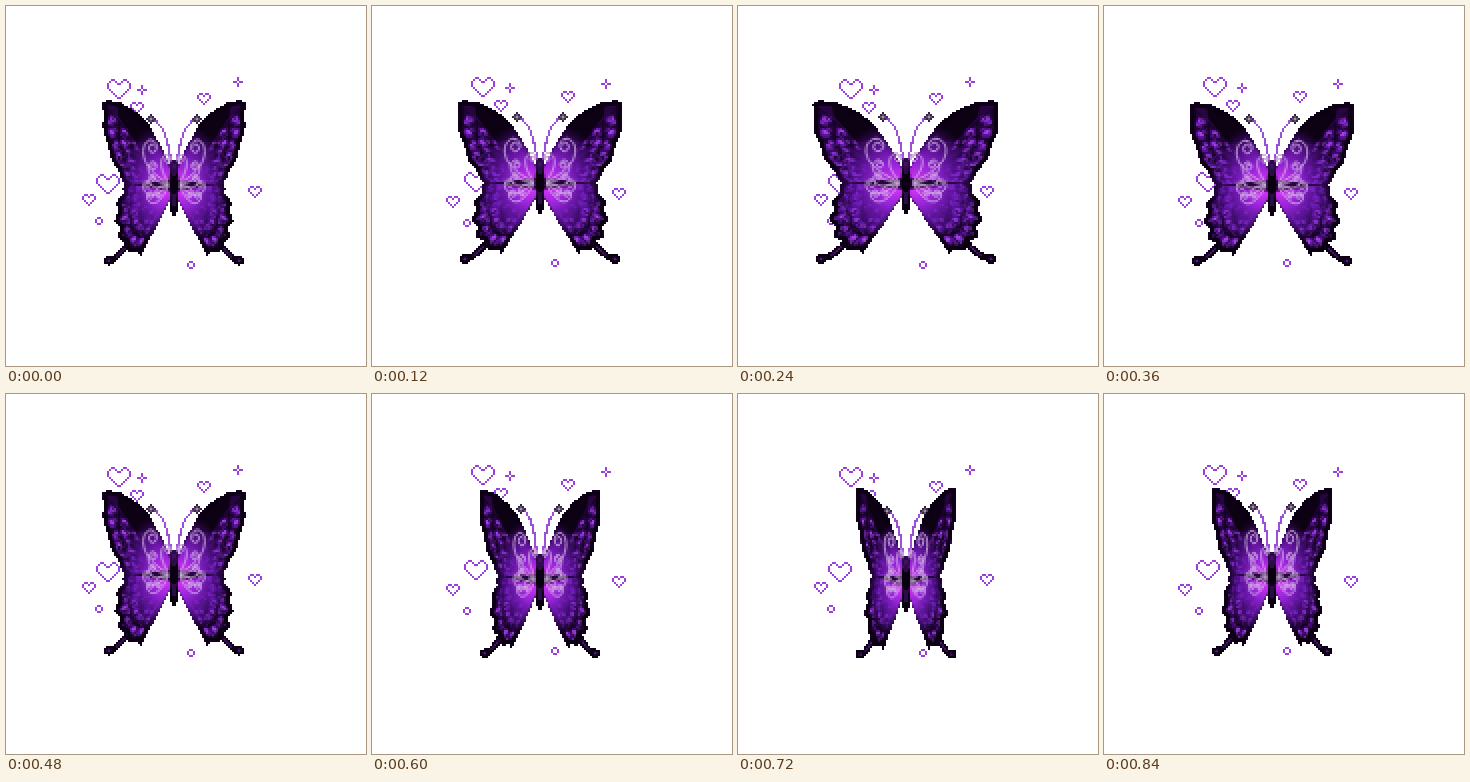
Write an HTML page with a canvas that moves like this. It is 360 by 360 pixels and loops after 960 ms.

```html
<!DOCTYPE html>
<html lang="en">
<head>
<meta charset="utf-8">
<title>Butterfly</title>
<style>
html, body { margin: 0; width: 100%; height: 100%; overflow: hidden; background: #fff; }
canvas { display: block; width: 100vw; height: 100vh; }
</style>
</head>
<body>
<canvas id="stage" width="360" height="360"></canvas>
<script>
const STEP = 120, STEPS = 8, SIZE = 360, MID = 168, ROOT = 177;
const INK = '#0b0012';

// painter, centre, and the shift taken on every second step
const CHARMS = [
  [bigHeart, 113, 83, -2, -2], [smallHeart, 131, 102, -2, -2], [smallHeart, 198, 93, -2, -2],
  [star, 136, 84, 2, -2], [star, 232, 76, 2, 2], [bigHeart, 102, 178, 2, -2],
  [smallHeart, 83, 194, -2, 2], [ring, 93, 215, 2, 2], [smallHeart, 249, 186, -2, 2],
  [ring, 185, 259, -2, -2]
];

// heading, length, bend
const FLOURISHES = [
  [-0.5, 100, -0.9], [-0.95, 58, -0.9], [-0.2, 64, -0.9],
  [0.25, 52, -0.9], [0.55, 66, -0.9], [0.95, 62, -0.9], [0.1, 40, 0.9]
];

function layer(size) {
  const canvas = document.createElement('canvas');
  canvas.width = canvas.height = size;
  return canvas.getContext('2d');
}

function seeded(seed) {
  return () => (seed = seed * 16807 % 2147483647) / 2147483647;
}

const range = (count, make) => Array.from({ length: count + 1 }, (_, i) => make(i / count));

function polyline(points) {
  const path = new Path2D();
  points.forEach(([x, y]) => path.lineTo(x, y));
  return path;
}

function line(g, points, color, width) {
  g.strokeStyle = color;
  g.lineWidth = width;
  g.stroke(polyline(points));
}

function dot(g, x, y, rx, ry, color) {
  g.fillStyle = color;
  g.beginPath();
  g.ellipse(x, y, rx, ry, 0, 0, 7);
  g.fill();
}

// Wing space: distance from the body axis, height on the stage.
const fan = (angle, r) => [r * Math.cos(angle), ROOT + r * Math.sin(angle)];

const upperRim = (t, scale = 1) =>
  fan(-0.71 * t, scale * (62 + 60 * t ** 1.15 + 1.2 * Math.sin(19 * t)));

const lowerRim = (t, scale = 1) =>
  fan(1.02 * t, scale * (60 + 27 * Math.sin(2.2 * t) + 2.8 * Math.sin(32 * t)));

const RIMS = [upperRim, lowerRim];

const OUTLINES = [
  [...range(40, t => upperRim(t)), [86, 95], [70, 97], [50, 105], [34, 117], [19, 137], [8, 155], [0, 170], [0, 184]],
  [...range(60, t => lowerRim(t)), [36, 236], [22, 217], [10, 198], [0, 185], [0, 172]]
];

function flourish([heading, length, bend]) {
  const count = 30;
  let [x, y] = [6, ROOT];
  return range(count, t => {
    heading += bend * t * t;
    x += length / count * Math.cos(heading);
    y += length / count * Math.sin(heading);
    return [x, y];
  });
}

function paintTail(g, map) {
  const points = range(8, t => [58 + 27 * t, 234 + 19 * Math.sin(t * 1.5)]).map(map);
  const [x, y] = points[8];
  line(g, points, INK, 6);
  dot(g, x, y, 5, 4.4, INK);
  line(g, points.slice(2, 6), '#6a20a0', 1.6);
  dot(g, x, y, 1.8, 1.4, '#5a1890');
}

function paintPatches(g, map, spread) {
  for (const rim of RIMS) {
    for (const [scale, size] of [[0.7, 6], [0.87, 6.5]]) {
      range(6, t => {
        const [x, y] = map(rim(0.06 + 0.88 * t, scale));
        dot(g, x, y, size * spread, size * 0.8, '#5a129c');
        dot(g, x, y - 1, size * spread * 0.55, size * 0.4, '#a440ea');
      });
    }
  }
}

function paintFlecks(g, map) {
  const random = seeded(41);
  for (let i = 0; i < 300; i++) {
    const rim = RIMS[i % 2];
    const [x, y] = map(rim(random(), 0.45 + 0.5 * random()));
    g.fillStyle = random() > 0.6 ? '#9a3fe499' : '#0d001a99';
    g.fillRect(x, y, 2 + 2 * random(), 2 + 2 * random());
  }
}

function paintVeins(g, map) {
  for (const rim of RIMS) {
    range(6, t => line(g, [rim(t, 0.35), rim(t, 0.97)].map(map), '#12001ecc', 1.8));
    line(g, range(20, t => rim(t, 0.78)).map(map), '#12001eaa', 2);
  }
}

// Black leading edge in the upper corner of the wing.
function paintShade(g, map) {
  g.fillStyle = '#0a0010e6';
  g.fill(polyline([[28, 122], [50, 104], [74, 97], [72, 110], [60, 124], [48, 136], [34, 134]].map(map)));
}

function paintGlow(g, spread, drop) {
  g.save();
  g.translate(0, ROOT + drop);
  g.scale(spread, 1);
  const glow = g.createRadialGradient(10, 2, 5, 10, 0, 62);
  glow.addColorStop(0, '#cf35f4');
  glow.addColorStop(0.3, '#9d26e4e8');
  glow.addColorStop(0.65, '#6f18bc99');
  glow.addColorStop(1, '#5a129c00');
  g.fillStyle = glow;
  g.fillRect(0, -90, 110, 180);
  g.restore();
}

function paintWing(g, { spread, drop, lift }) {
  const map = ([u, v]) => [u * spread, v + drop - lift * (u / 93) * (1 + (175 - v) / 130)];
  const shapes = OUTLINES.map(points => polyline(points.map(map)));
  const whole = new Path2D();
  shapes.forEach(shape => whole.addPath(shape));

  paintTail(g, map);
  g.save();
  g.fillStyle = '#27063f';
  shapes.forEach(shape => g.fill(shape));
  g.clip(whole);
  paintPatches(g, map, spread);
  paintFlecks(g, map);
  paintVeins(g, map);
  paintShade(g, map);
  g.strokeStyle = INK;
  g.lineWidth = 8;
  shapes.forEach(shape => g.stroke(shape));
  paintGlow(g, spread, drop);
  g.restore();
  FLOURISHES.forEach(f => line(g, flourish(f).map(map), '#d6b4e4d0', 1.9));
}

function paintAntenna(g, { drop, reach }) {
  const top = 87 + reach + drop;
  const stalk = new Path2D();
  stalk.moveTo(reach, top);
  stalk.bezierCurveTo(reach * 0.5, top + 4, 5, top + 22, 3, 155 + drop);
  g.strokeStyle = '#9c50d8';
  g.lineWidth = 2;
  g.stroke(stalk);
  dot(g, reach, top + 1, 4.2, 4.2, '#30203b');
  dot(g, reach, top + 1, 2, 2, '#a595ae');
}

function paintBody(g, drop) {
  dot(g, 0, 158 + drop, 4, 6.5, '#2c0a4a');
  dot(g, 0, 174 + drop, 4.8, 14, INK);
  dot(g, 0, 193 + drop, 4, 16, INK);
  g.fillStyle = '#4d1a78';
  g.fillRect(-1, 156 + drop, 2, 12);
  g.fillRect(-1, 186 + drop, 2, 12);
}

function harden(g, size) {
  const image = g.getImageData(0, 0, size, size);
  for (let i = 3; i < image.data.length; i += 4) image.data[i] = image.data[i] > 105 ? 255 : 0;
  g.putImageData(image, 0, 0);
}

function paintButterfly(pose) {
  const g = layer(SIZE / 2);
  g.lineJoin = g.lineCap = 'round';
  for (const side of [-1, 1]) {
    g.setTransform(side / 2, 0, 0, 0.5, MID / 2, 0);
    paintAntenna(g, pose);
    paintWing(g, pose);
  }
  paintBody(g, pose.drop);
  harden(g, SIZE / 2);
  return g.canvas;
}

// Charms are built from 2px cells around their centre.
const cell = (g, x, y, w = 1, h = 1) => g.fillRect(x * 2, y * 2, w * 2, h * 2);

function heart(g, columns, inner) {
  const tip = 2 * columns - 3;
  const lift = (tip + 1) / 2;
  for (let c = 0; c < columns; c++) {
    const top = Math.abs(c - (columns - 1) / 2) - 0.5;
    const bottom = tip - c;
    for (const x of [inner + c - 0.5, -inner - c - 0.5]) {
      cell(g, x, top - lift);
      cell(g, x, bottom - lift);
      if (c === columns - 1) cell(g, x, top - lift, 1, bottom - top);
    }
  }
}

function bigHeart(g) { heart(g, 6, 0.5); }

function smallHeart(g) { heart(g, 4, 0); }

function star(g) {
  for (const arm of [-2.5, 0.5]) {
    cell(g, arm, -0.5, 2, 1);
    cell(g, -0.5, arm, 1, 2);
  }
}

function ring(g) {
  for (const edge of [-2, 1]) {
    cell(g, edge, -1, 1, 2);
    cell(g, -1, edge, 2, 1);
  }
}

// The wings fold in even steps; the body sinks as they close and lags on the way.
function poseAt(index) {
  const fold = Math.abs((index + 2) % STEPS - 4);
  const sink = Math.floor(0.67 * fold * fold);
  const lag = index > 2 && index < 6 ? 2 : 0;
  return { spread: 1 - 0.116 * fold, drop: sink + lag, lift: 0.75 * sink, reach: fold > 2 ? 19 : 23 };
}

function paintScene(index) {
  const g = layer(SIZE);
  g.fillStyle = '#fff';
  g.fillRect(0, 0, SIZE, SIZE);
  const shift = index % 2;
  g.fillStyle = '#983fdc';
  for (const [paint, x, y, dx, dy] of CHARMS) {
    g.setTransform(1, 0, 0, 1, x + dx * shift, y + dy * shift);
    paint(g);
  }
  g.resetTransform();
  g.imageSmoothingEnabled = false;
  g.drawImage(paintButterfly(poseAt(index)), 0, 0, SIZE, SIZE);
  return g.canvas;
}

const scenes = Array.from({ length: STEPS }, (_, i) => paintScene(i));
const stage = document.getElementById('stage').getContext('2d');
const start = performance.now();

function play() {
  const index = Math.floor((performance.now() - start) / STEP) % STEPS;
  stage.drawImage(scenes[index], 0, 0);
  requestAnimationFrame(play);
}
play();
</script>
</body>
</html>
```
